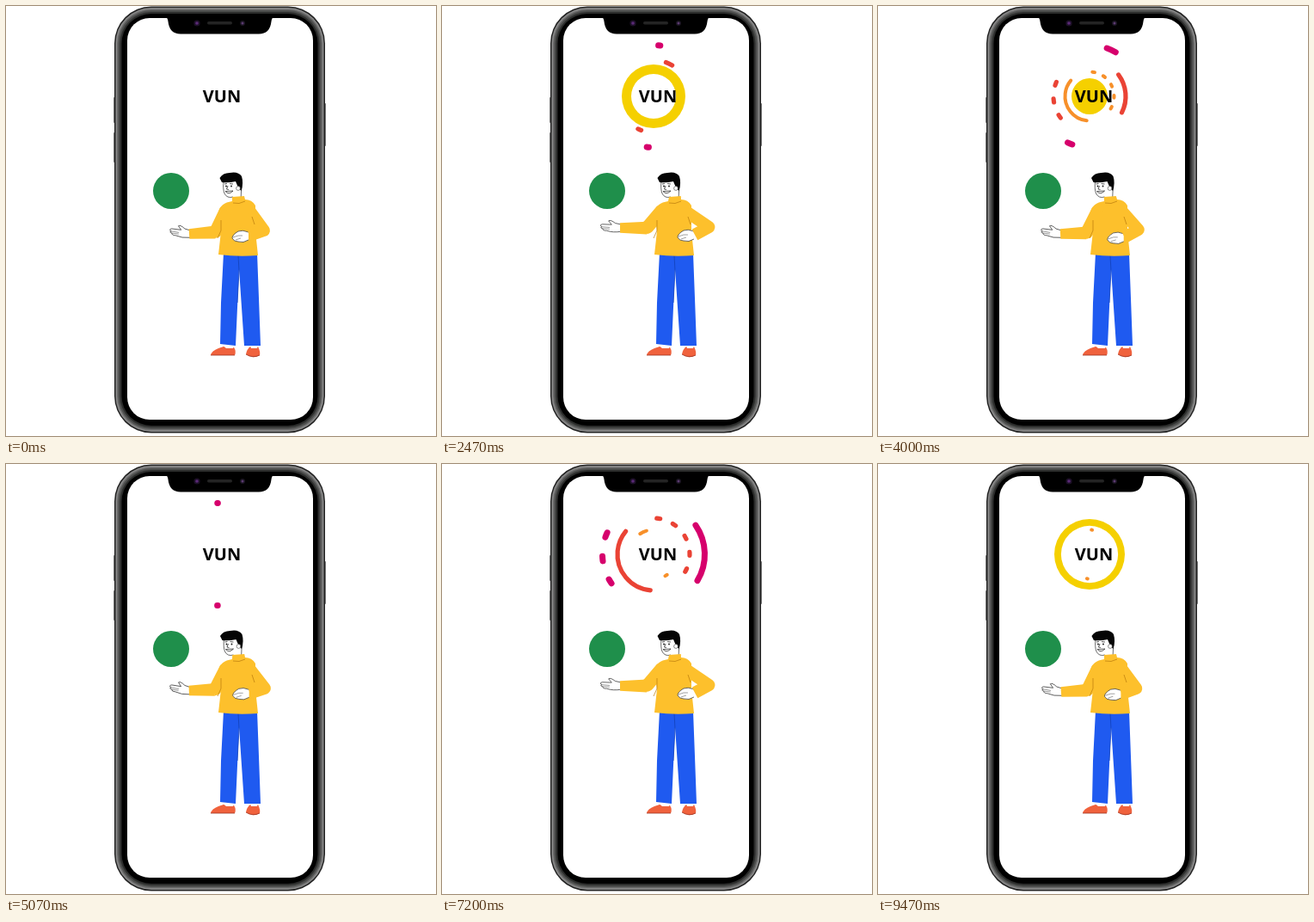
An HTML page with a canvas for the animation above (9.51 s loop, 500 by 500 pixels).

```html
<!DOCTYPE html>
<html lang="en">
<head>
<meta charset="utf-8">
<style>
html, body { margin: 0; width: 100%; height: 100%; overflow: hidden; background: #fff; }
canvas { display: block; }
</style>
</head>
<body>
<canvas id="stage" width="500" height="500"></canvas>
<script>
const ctx = document.getElementById('stage').getContext('2d');
const LOOP = 9510, STEP = 1000 / 30;
const BURST = 50.2, GESTURE = 145; // periods in steps
const CX = 246, CY = 105, TAU = Math.PI * 2;
const SHIRT = '#fdc02c', CREASE = '#b97a0c', INK = '#111', SOFT = '#444';
const PANTS = '#1f5af0', SHOE = '#f0623d';

// Smooth monotone curve through [x, y] points
function curve(pts, x) {
  const last = pts.length - 1;
  if (x <= pts[0][0]) return pts[0][1];
  if (x >= pts[last][0]) return pts[last][1];
  const slope = i => (pts[i + 1][1] - pts[i][1]) / (pts[i + 1][0] - pts[i][0]);
  const tangent = i => {
    if (i === 0 || i === last) return 0;
    const a = slope(i - 1), b = slope(i);
    return a * b <= 0 ? 0 : 2 * a * b / (a + b);
  };
  let i = 0;
  while (x > pts[i + 1][0]) i++;
  const h = pts[i + 1][0] - pts[i][0], u = (x - pts[i][0]) / h, v = 1 - u;
  return pts[i][1] * (1 + 2 * u) * v * v + tangent(i) * h * u * v * v
    + pts[i + 1][1] * u * u * (3 - 2 * u) - tangent(i + 1) * h * u * u * v;
}

const LEAD = [[1, 0], [6, .075], [11, .49], [15.3, .85], [19.6, .945], [23.8, .985], [28, 1]];
const TAIL = [[1, 0], [6, .04], [11, .142], [15.3, .672], [19.6, .915], [23.8, .979], [28, 1]];
const OUTER = [[16, 0], [19.6, 21], [23.8, 37], [28, 40], [31.4, 41], [50, 41]];
const INNER = [[20, 0], [23.8, 26], [28, 31], [31.4, 32.7], [34, 33.4], [39, 35], [47, 41]];
const ARCS = [
  { r: 59.5, w: 7, color: '#d6006c', delay: 0 },
  { r: 42, w: 5.2, color: '#ea4335', delay: 4.25 },
  { r: 28.5, w: 4, color: '#f7902a', delay: 8.7 }
];

function fill(color, draw) {
  ctx.beginPath();
  draw();
  ctx.fillStyle = color;
  ctx.fill();
}

function line(color, width, draw) {
  ctx.beginPath();
  draw();
  ctx.strokeStyle = color;
  ctx.lineWidth = width;
  ctx.stroke();
}

function poly(...p) {
  ctx.moveTo(p[0], p[1]);
  for (let i = 2; i < p.length; i += 2) ctx.lineTo(p[i], p[i + 1]);
}

function box(color, x, y, w, h, r) {
  fill(color, () => ctx.roundRect(x, y, w, h, r));
}

function disc(color, x, y, r) {
  fill(color, () => ctx.arc(x, y, r, 0, TAU));
}

function phone() {
  for (const [y, h] of [[106, 30], [147, 35]]) box('#777', 125, y, 3, h, 1);
  box('#777', 369, 113, 3, 50, 1);
  // Metal rim, from the outer edge inwards
  const rim = [[0, '#222'], [1.5, '#8a8a8a'], [3, '#6c6c6c'], [4.5, '#4c4d4c'], [6.5, '#2c2d2c'], [8.5, '#000']];
  for (const [d, color] of rim) box(color, 126 + d, .5 + d, 245 - 2 * d, 496 - 2 * d, 43 - d);
  box('#fff', 141, 14, 216, 467, 26);
  fill('#000', () => {
    ctx.moveTo(186, 13);
    ctx.quadraticCurveTo(188, 14, 188.5, 18);
    ctx.quadraticCurveTo(190, 32.5, 203, 32.5);
    ctx.lineTo(294, 32.5);
    ctx.quadraticCurveTo(307, 32.5, 308.5, 18);
    ctx.quadraticCurveTo(309, 14, 311, 13);
    ctx.closePath();
  });
  disc('#1d1028', 222, 20, 3.6);
  disc('#5b2a78', 222, 20, 1.8);
  box('#242424', 234, 18, 29, 3.5, 1.7);
  disc('#1b1522', 275, 20, 3);
  disc('#5b3a70', 275, 20, 1.5);
}

function burst(p) {
  ctx.lineCap = 'round';
  for (const a of ARCS) {
    const q = p - a.delay;
    if (q <= 1 || q >= 28) continue;
    const from = (.75 - curve(LEAD, q)) * TAU;
    const to = Math.max((.75 - curve(TAIL, q)) * TAU, from + .01);
    line(a.color, a.w, () => ctx.arc(CX, CY, a.r, from, to));
    const deg = a.r * Math.PI / 180;
    ctx.setLineDash([5.5 * deg, 21.5 * deg]);
    line(a.color, a.w, () => ctx.arc(CX, CY, a.r, from + Math.PI, to + Math.PI));
    ctx.setLineDash([]);
  }
  const outer = curve(OUTER, p), inner = curve(INNER, p);
  if (outer - inner > .1) {
    fill('#f5d000', () => {
      ctx.arc(CX, CY, outer, 0, TAU);
      ctx.moveTo(CX + inner, CY);
      ctx.arc(CX, CY, inner, 0, TAU, true);
    });
  }
}

// Each pose: near elbow, wrist, fingertip; far elbow, wrist, hand; head shift
const REST = [243, 263, 213, 265, 190, 261, 300, 261, 283, 267, 273, 268, 0];
const LIFT = [238, 256, 211, 250, 188, 239, 309.5, 259, 290, 263, 280, 261, 5];
const OFFER = [238, 258, 207, 258, 183.5, 256, 310.5, 257, 294, 266, 284, 267, 2];
const BACK = [242, 264, 212, 265, 189, 261, 303, 260, 287, 269, 277, 270, -.5];
const POSES = [[0, REST], [35, LIFT], [72, OFFER], [115, BACK], [GESTURE, REST]];

function poseAt(s) {
  let i = 0;
  while (s >= POSES[i + 1][0]) i++;
  const [a, from] = POSES[i], [b, to] = POSES[i + 1];
  const k = (1 - Math.cos(Math.PI * (s - a) / (b - a))) / 2;
  return from.map((v, n) => v + (to[n] - v) * k);
}

function legs() {
  fill(PANTS, () => {
    poly(253, 287, 250, 345, 249, 393, 267, 395, 271, 306, 277, 395, 296, 395, 294, 340, 292, 287);
    ctx.closePath();
  });
  line('#1442b8', .8, () => poly(270, 290, 271, 308, 269, 345));
  fill(SHOE, () => {
    ctx.moveTo(238, 406);
    ctx.quadraticCurveTo(239, 401, 247, 398);
    ctx.lineTo(253, 396);
    ctx.lineTo(265, 397);
    ctx.quadraticCurveTo(268, 401, 266, 406);
    ctx.closePath();
  });
  fill(SHOE, () => {
    ctx.moveTo(279, 405);
    ctx.quadraticCurveTo(280, 399, 284, 396);
    ctx.lineTo(293, 396);
    ctx.quadraticCurveTo(296, 402, 295, 406);
    ctx.quadraticCurveTo(287, 411, 279, 405);
  });
  line('#9c3322', .8, () => {
    poly(238, 406, 266, 406);
    ctx.moveTo(279, 405);
    ctx.quadraticCurveTo(287, 410, 295, 406);
  });
  fill('#fff', () => poly(253, 395.5, 265, 395.5, 264, 398, 256, 398));
  fill('#fff', () => poly(284, 395.5, 293, 395.5, 292, 398, 285, 398));
}

function outlined(draw) {
  fill('#fff', draw);
  line(SOFT, .8, draw);
}

function openHand(wx, wy, tx, ty) {
  ctx.save();
  ctx.translate(wx, wy);
  ctx.rotate(Math.atan2(ty - wy, tx - wx) - Math.PI);
  outlined(() => {
    ctx.moveTo(2, -4);
    ctx.lineTo(-6, -5);
    ctx.quadraticCurveTo(-12, -9, -14, -7);
    ctx.quadraticCurveTo(-12, -5, -10, -3);
    ctx.lineTo(-21, -2.5);
    ctx.quadraticCurveTo(-25, -1, -21, .5);
    ctx.quadraticCurveTo(-24, 2, -20, 2.5);
    ctx.quadraticCurveTo(-20, 5, -15, 4.5);
    ctx.quadraticCurveTo(-8, 6.5, 2, 4);
  });
  line(SOFT, .5, () => {
    poly(-21, .5, -12, .5);
    ctx.moveTo(-20, 2.5);
    ctx.lineTo(-12, 2.3);
  });
  ctx.restore();
}

function foldedHand(x, y) {
  outlined(() => {
    ctx.moveTo(x + 9, y - 5);
    ctx.quadraticCurveTo(x + 2, y - 8, x - 3, y - 6);
    ctx.quadraticCurveTo(x - 10, y - 2, x - 10, y + 2);
    ctx.quadraticCurveTo(x - 8, y + 6, x - 3, y + 6);
    ctx.quadraticCurveTo(x + 3, y + 8, x + 9, y + 4);
  });
  line(SOFT, .5, () => {
    poly(x - 9, y + 1, x - 3, y - 1, x + 2, y - 1);
    ctx.moveTo(x - 6, y + 4);
    ctx.lineTo(x, y + 2);
  });
}

function head(dx) {
  ctx.save();
  ctx.translate(dx, 0);
  outlined(() => {
    ctx.moveTo(253, 203);
    ctx.quadraticCurveTo(252, 213, 254, 218);
    ctx.quadraticCurveTo(257, 224, 264, 222);
    ctx.lineTo(264, 228);
    ctx.lineTo(273, 227);
    ctx.lineTo(274, 204);
  });
  fill('#050505', () => {
    ctx.moveTo(248.5, 200);
    ctx.quadraticCurveTo(252, 194, 260, 194);
    ctx.quadraticCurveTo(270, 192, 274, 198);
    ctx.quadraticCurveTo(276.5, 206, 273.5, 215);
    ctx.lineTo(270, 211);
    ctx.lineTo(267, 204);
    ctx.quadraticCurveTo(258, 206, 251, 205);
    ctx.closePath();
  });
  disc('#fff', 270, 212, 2.4);
  line(SOFT, .6, () => ctx.arc(270, 212, 2.4, 0, TAU));
  disc(INK, 256, 209.5, .9);
  disc(INK, 262, 209.5, .9);
  line(INK, .7, () => {
    poly(254, 207, 257, 206.5);
    ctx.moveTo(260, 206.5);
    ctx.lineTo(264, 207);
    ctx.moveTo(258, 209);
    ctx.lineTo(256.5, 213);
    ctx.lineTo(259, 213.5);
    ctx.moveTo(255, 215.5);
    ctx.quadraticCurveTo(259, 220, 264, 215);
    ctx.closePath();
  });
  ctx.restore();
}

function person(s) {
  const [ex, ey, wx, wy, tx, ty, fx, fy, gx, gy, hx, hy, dx] = poseAt(s);
  ctx.lineCap = 'butt';
  ctx.lineJoin = 'round';
  legs();
  head(dx);
  fill(SHIRT, () => {
    ctx.moveTo(263 + dx * .5, 222);
    ctx.lineTo(277 + dx * .4, 221);
    ctx.lineTo(278, 225);
    ctx.quadraticCurveTo(286, 225, 290, 232);
    ctx.lineTo(290, 262);
    ctx.lineTo(293, 290);
    ctx.quadraticCurveTo(270, 292, 247, 289);
    ctx.lineTo(250, 262);
    ctx.lineTo(247, 240);
    ctx.quadraticCurveTo(249, 229, 263, 227);
    ctx.closePath();
  });
  foldedHand(hx, hy);
  line(SHIRT, 14, () => poly(284, 239, fx, fy, gx, gy));
  openHand(wx, wy, tx, ty);
  line(SHIRT, 15, () => poly(256, 237, ex + 1, ey - 1, ex - 2, ey));
  // Forearm narrows toward the cuff
  const len = Math.hypot(wx - ex, wy - ey), nx = (wy - ey) / len, ny = (ex - wx) / len;
  fill(SHIRT, () => poly(ex + nx * 7.4, ey + ny * 7.4, wx + nx * 5.8, wy + ny * 5.8,
    wx - nx * 5.8, wy - ny * 5.8, ex - nx * 7.4, ey - ny * 7.4));
  line(CREASE, .7, () => {
    poly(250, 249, 250, 261, 246, 270);
    ctx.moveTo(286, 245);
    ctx.lineTo(289, 254);
    ctx.moveTo(264, 229);
    ctx.quadraticCurveTo(271, 231, 278, 227);
  });
}

function frame(now) {
  const s = Math.floor((now % LOOP + 4) / STEP);
  ctx.fillStyle = '#fff';
  ctx.fillRect(0, 0, 500, 500);
  phone();
  burst(s % BURST);
  ctx.fillStyle = '#000';
  ctx.font = '700 20px "Open Sans", "Noto Sans", sans-serif';
  ctx.textAlign = 'center';
  ctx.fillText('VUN', 251, 112);
  disc('#1f8f4b', 192, 215, 21);
  person(s % GESTURE);
}

const start = performance.now();
function tick() {
  frame(performance.now() - start);
  requestAnimationFrame(tick);
}
tick();
</script>
</body>
</html>
```
